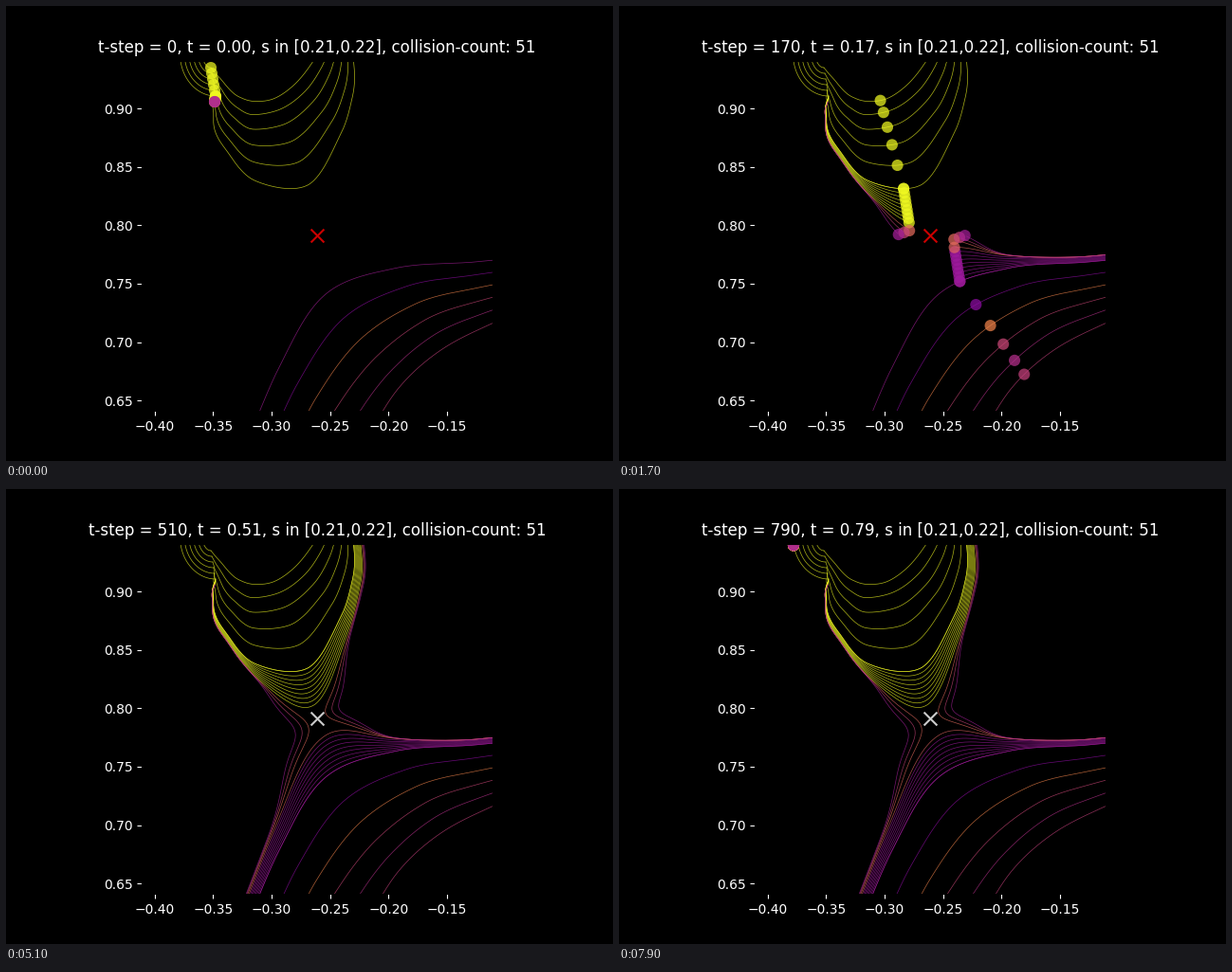
A matplotlib script for the animation above (8000 ms loop, 640 px wide and 480 px high).

```python
import numpy as np
import matplotlib.pyplot as plt
from matplotlib.animation import FuncAnimation

FRAMES = 80
CX, CY, HALF, SCALE = -0.26108, 0.79102, 0.15, 1232
HIT = 17.7  # frame of closest approach
ALPHA = 0.72
plasma = plt.get_cmap("plasma")

# Four guiding orbits in stage pixels, given at a few times (in frames).
T_LEFT = np.array([0, 6, 12, 15, 18, 21, 24, 30.])
T_RIGHT = np.array([9, 12, 15, 18, 21, 24, 30.])
INNER = [(216, 65), (225, 75.5), (246, 96), (261.5, 100.5),
         (283, 97.5), (305, 82), (324, 58), (342, 10)]
OUTER = [(221, 95), (218.5, 110), (230, 149), (262, 184),
         (318, 189), (352, 137), (365, 97), (365, 38)]
NEAR = [(578, 262), (495, 270), (411, 276.5), (337, 304),
        (289, 379), (243, 488), (150, 710)]
FAR = [(573, 311), (510, 336), (457, 364), (414, 403),
       (381, 456), (357, 505), (315, 610)]


def spline(knots, pts, t):
    """Cubic Hermite curve through pts, evaluated at times t."""
    pts, t = np.array(pts, float), np.clip(t, knots[0], knots[-1])
    m = np.gradient(pts, knots, axis=0)
    i = np.clip(np.searchsorted(knots, t, side="right") - 1, 0, len(knots) - 2)
    h = (knots[i + 1] - knots[i])[:, None]
    u = (t - knots[i])[:, None] / h
    return ((2 * u**3 - 3 * u**2 + 1) * pts[i] + (u**3 - 2 * u**2 + u) * h * m[i]
            + (3 * u**2 - 2 * u**3) * pts[i + 1] + (u**3 - u**2) * h * m[i + 1])


def sigmoid(t, center, width):
    return 1 / (1 + np.exp(-(t - center) / width))


def bump(t, before, after):
    return np.exp(-((t - HIT) / np.where(t < HIT, before, after))**2)


def outer_left(t):
    return spline(T_LEFT, OUTER, t)


def near_right(t):
    return spline(T_RIGHT, NEAR, t)


def family(knots, a, b, bend):
    """Blend of two orbits whose spacing is bent around the encounter."""
    def at(x):
        def orbit(t):
            f = (x + bend * x * (1 - x) * bump(t, 3, 3))[:, None]
            return (1 - f) * spline(knots, a, t) + f * spline(knots, b, t)
        return orbit
    return [at(k / 5) for k in range(6)]


def spread(t):
    """Shift from the fixed orbits towards the collision point."""
    b = bump(t, 2.2, 3)
    return np.column_stack([9 * sigmoid(t, 20, 1) + 7 * b - 1, 6 + 33 * b])


def left_turn(f):
    return lambda t: outer_left(t) + f * spread(t)


def right_turn(f):
    return lambda t: near_right(t) - f * spread(t)


def swap(enter, leave, side):
    """Come in on one track and go out on the other, bulging to one side."""
    def orbit(t):
        w = sigmoid(t, 17.5, 0.36)[:, None]
        b = bump(t, 2.2, 3)**2
        push = np.column_stack([14 * b + 2 * sigmoid(t, 21, 1), -5 * b])
        return (1 - w) * enter(t) + w * leave(t) + side * push
    return orbit


def to_data(p):
    return CX + (p[:, 0] - 328) / SCALE, CY - (p[:, 1] - 242.4) / SCALE


def return_arc(k, end):
    """Closing stretch of an orbit, from the top edge to its start point."""
    start = np.array([183.5 + 4.7 * (5 - k), 52])
    w, h = end - start
    c1, c2 = start + [1, 0.6 * h], end - [0.5 * w, 0]
    u = np.linspace(0, 1, 40)[:, None]
    return ((1 - u)**3 * start + 3 * u * (1 - u)**2 * c1
            + 3 * u**2 * (1 - u) * c2 + u**3 * end)


steps = np.arange(9) / 8
sides = np.linspace(0.8, 1.8, 3)
swap_tones = np.linspace(0.62, 0.36, 3)

fixed_left = family(T_LEFT, INNER, OUTER, -0.43)
fixed_right = family(T_RIGHT, NEAR, FAR, 0.33)
grow_left = ([left_turn(f) for f in steps]
             + [swap(left_turn(1), right_turn(1), -s) for s in sides])
grow_right = ([right_turn(f) for f in steps]
              + [swap(right_turn(1), left_turn(1), s) for s in sides])

# (orbit, tone, first frame, grows)
bodies = [(o, 1.0, 0, False) for o in fixed_left]
bodies += [(o, c, 0, True) for o, c in zip(grow_left, [1.0] * 9 + [*swap_tones])]
bodies += [(o, c, 9, False)
           for o, c in zip(fixed_right, [0.36, 0.3, 0.7, 0.5, 0.42, 0.48])]
bodies += [(o, c, 9, True)
           for o, c in zip(grow_right, [0.34] * 8 + [0.6, *swap_tones])]

fig = plt.figure(figsize=(6.4, 4.8), dpi=100, facecolor="black")
ax = fig.add_subplot(facecolor="black")
ax.set_aspect("equal")
ax.set_xlim(CX - HALF, CX + HALF)
ax.set_ylim(CY - HALF, CY + HALF)
ax.set_xticks(np.arange(-0.40, -0.14, 0.05))
ax.set_yticks(np.arange(0.65, 0.91, 0.05))
ax.tick_params(colors="white")
ax.spines[:].set_color("black")
title = ax.set_title("", color="white")


def draw_line(p, tone):
    return ax.plot(*to_data(p), color=plasma(tone), lw=0.5, alpha=ALPHA, zorder=1)[0]


trails = []
for orbit, tone, start, grows in bodies:
    times = np.linspace(start, 30, 300)
    curve = orbit(times)
    line = draw_line(curve, tone)
    if grows:
        trails.append((line, times, curve))

for k, orbit in enumerate(fixed_left):
    draw_line(return_arc(k, orbit(np.zeros(1))[0]), 1.0)

dots = ax.scatter([CX] * len(bodies), [CY] * len(bodies), s=76, linewidths=0,
                  c=[plasma(b[1]) for b in bodies], alpha=ALPHA, zorder=2)
cross = ax.scatter([CX], [CY], s=100, marker="x", c="red", alpha=0.8, zorder=3)


def position(i, orbit, start, grows):
    if i > 70 and grows and start == 0:  # back along the closing arc
        return np.array([[184, 59.5 + 2.8 * (i - 79)]])
    return orbit(np.array([float(i)]))


def update(i):
    title.set_text(f"t-step = {10 * i}, t = {i / 100:.2f}, "
                   "s in [0.21,0.22], collision-count: 51")
    spots = np.vstack([position(i, o, s, g) for o, _, s, g in bodies])
    dots.set_offsets(np.column_stack(to_data(spots)))
    for line, times, curve in trails:
        line.set_data(*to_data(curve[times <= i]))
    cross.set_color("red" if i < HIT else "white")
    return [title, dots, cross] + [t[0] for t in trails]


anim = FuncAnimation(fig, update, frames=FRAMES, interval=100,
                     repeat=True, repeat_delay=0, blit=False)
plt.show()
```
